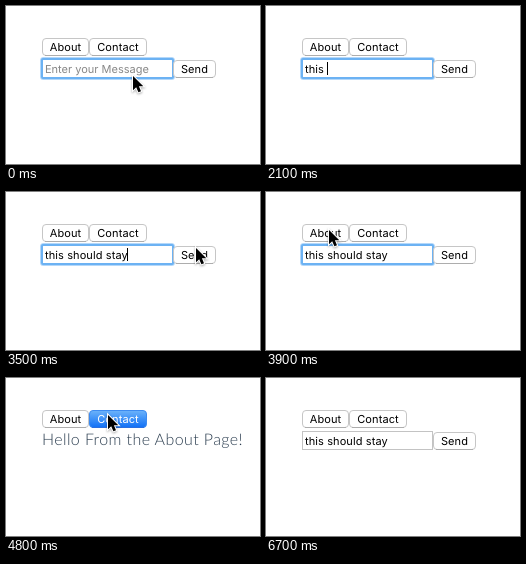
These frames come from a looping animation (254 px wide and 158 px high, 6.9 s). An HTML page:

```html
<!DOCTYPE html>
<html lang="en">
<head>
<meta charset="utf-8">
<title>Message form that keeps its text</title>
<style>
  html, body { margin: 0; width: 100%; height: 100%; overflow: hidden; background: #fff; }
  svg { display: block; width: 254px; height: 158px; }
  text {
    font: 11px Inter, "Liberation Sans", sans-serif; letter-spacing: .1px;
    white-space: pre; text-rendering: geometricPrecision;
  }
  .button rect { fill: #fff; stroke: #c6c6c6; }
  .button path { fill: none; stroke: #adadad; }
  .button text { text-anchor: middle; }
  .pressed rect { fill: url(#blue); stroke: #3d8bf0; }
  .pressed path { stroke: #2a6fe0; }
  .pressed text { fill: #fff; }
  .hint { fill: #888; letter-spacing: 0; }
  #page { font: 300 16px Lato, "Open Sans", sans-serif; letter-spacing: .4px; fill: #2c3e50; }
  #cursor { stroke: #fff; stroke-width: 2; paint-order: stroke; filter: drop-shadow(0 1px 1px #0005); }
</style>
</head>
<body>
<svg viewBox="0 0 254 158">
  <defs>
    <linearGradient id="blue" x2="0" y2="1">
      <stop stop-color="#6cb3fa"/>
      <stop offset="1" stop-color="#1070f6"/>
    </linearGradient>
  </defs>
  <g id="buttons"></g>
  <g id="form">
    <rect x="36.5" y="53.5" width="130" height="18" fill="#fff" stroke="#c3c3c3"/>
    <g id="ring" fill="none">
      <rect x="35.5" y="52.5" width="132" height="20" rx="2" stroke="#b4d8fa" stroke-width="3"/>
      <rect x="36" y="53" width="131" height="19" rx="1" stroke="#6cb2f3" stroke-width="2"/>
    </g>
    <text id="field" x="39" y="67"></text>
    <rect id="caret" y="56" width="1" height="13"/>
  </g>
  <text id="page" x="36" y="67">Hello From the About Page!</text>
  <path id="cursor" d="M0 0V14.3L3.2 11.3 5.4 16.3 8 15.2 5.9 10.3H10.3Z"/>
</svg>
<script>
const LOOP = 6900, STEP = 100, MESSAGE = "this should stay";
const TYPE_START = 1700, TYPE_END = 3200;
const $ = id => document.getElementById(id);
const show = (el, on) => el.setAttribute("visibility", on ? "inherit" : "hidden");

function addButton(label, x, y, w, parent) {
  const g = document.createElementNS("http://www.w3.org/2000/svg", "g");
  g.setAttribute("class", "button");
  g.innerHTML = `<rect x="${x + .5}" y="${y + .5}" width="${w - 1}" height="17" rx="3.5"/>
    <path d="M${x + 3} ${y + 17.5}h${w - 6}"/>
    <text x="${x + w / 2}" y="${y + 13}">${label}</text>`;
  parent.append(g);
  return g;
}
const about = addButton("About", 36, 32, 47, $("buttons"));
const contact = addButton("Contact", 83, 32, 58, $("buttons"));
addButton("Send", 167, 54, 43, $("form"));

// Pointer positions: time, x, y; each holds until the next, null hides it
const pointer = [
  [0, 127, 70], [100, 124, 55], [300, 124, 54], [500, 124, 53], [1300, 124.5, 57.5],
  [TYPE_START, null],
  [3500, 190, 56], [3600, 160, 54], [3700, 118, 48], [3800, 80, 41], [3900, 63, 38],
  [4300, 74, 38], [4400, 91, 37.5], [4500, 102, 37],
  [6600, 102, 40], [6700, null]
];

function caretOn(t) {
  if (t < TYPE_START) return t >= 300 && (t - 300) % 1000 < 500;
  return t < TYPE_END + 500;
}

function draw(t) {
  const focused = t < 4000, onAbout = t >= 4200 && t < 5000;
  const typed = MESSAGE.slice(0, Math.max(0, (t - TYPE_START) / STEP + 1));

  show($("form"), !onAbout);
  show($("page"), onAbout);
  show($("ring"), focused);
  about.classList.toggle("pressed", t >= 4000 && t < 4200);
  contact.classList.toggle("pressed", t >= 4800 && t < 5000);

  const field = $("field");
  field.textContent = typed || "Enter your Message";
  field.classList.toggle("hint", !typed);
  const width = typed ? field.getComputedTextLength() : 0;
  $("caret").setAttribute("x", Math.floor(39 + width));
  show($("caret"), focused && caretOn(t));

  const [, x, y] = pointer.findLast(p => p[0] <= t);
  show($("cursor"), x !== null);
  if (x !== null) $("cursor").setAttribute("transform", `translate(${x} ${y})`);
}

const start = performance.now();
function tick() {
  const t = (performance.now() - start) % LOOP;
  draw(Math.floor(t / STEP) * STEP);
  requestAnimationFrame(tick);
}
tick();
</script>
</body>
</html>
```
